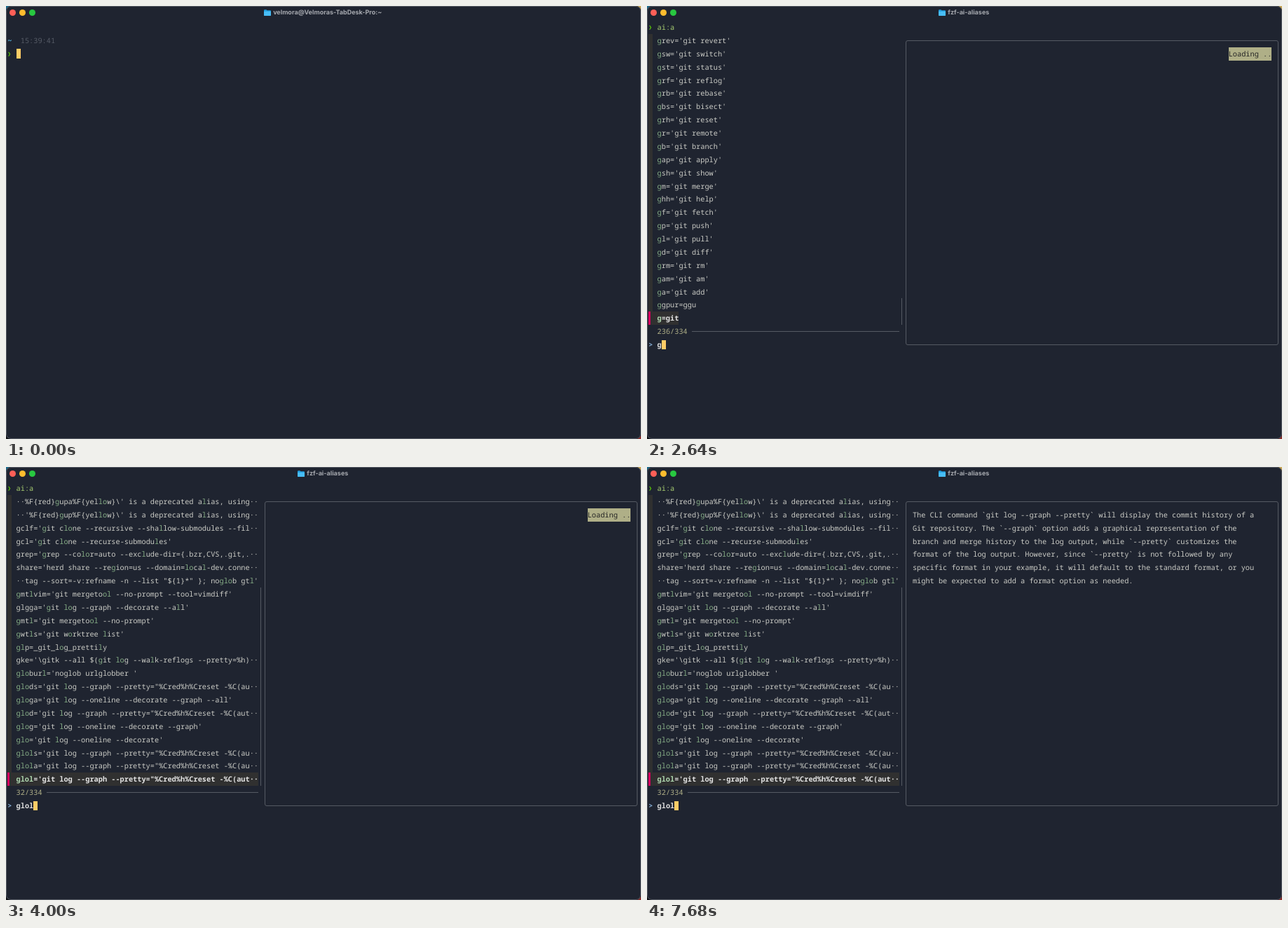
Animation of 906x618 px, one loop 8000 ms. Source, as an HTML page:

```html
<!DOCTYPE html>
<html lang="en">
<head>
<meta charset="utf-8">
<title>Alias picker</title>
<style>
  :root { --bg: #1f2430; --line: #555a63; --cw: 6.175px; --lh: 18.875px; }
  html, body { margin: 0; width: 100%; height: 100%; overflow: hidden; }
  body {
    background:
      linear-gradient(90deg, #1d6c8c 50%, #c9a85a 0) 0 0 / 100% 50% no-repeat,
      linear-gradient(90deg, #101216 50%, #8c2f2c 0) 0 100% / 100% 50% no-repeat;
  }
  #win {
    position: absolute; inset: 0; box-sizing: border-box; overflow: hidden;
    background: var(--bg); border-radius: 7px;
    font: 10.29px/20.875px "Noto Sans Mono", "DejaVu Sans Mono", monospace;
    font-variant-ligatures: none; text-rendering: geometricPrecision;
    color: #cbccc6;
  }
  #win::after {
    content: ""; position: absolute; inset: 0; border-radius: 7px;
    border: 1px solid #565b65;
  }
  #win i { position: absolute; top: 5.1px; width: 9px; height: 9px; border-radius: 50%; }
  #win .title {
    position: absolute; top: 0; left: 0; width: 904.6px; height: 19px;
    display: flex; justify-content: center; align-items: center; gap: 3px;
    font: 700 9px/19px Inter, "Open Sans", sans-serif; color: #a6a9af;
  }
  .scene { position: absolute; inset: 0; visibility: hidden; }
  .scene.on { visibility: visible; }
  .t {
    position: absolute; white-space: pre; height: var(--lh);
    left: calc(2.2px + var(--c) * var(--cw)); top: calc(21px + var(--r) * var(--lh));
  }
  .box { position: absolute; }
  .caret { width: 6.2px; height: 13.7px; margin-top: 2.5px; background: #ffcc66; }
  .arrow { color: #5fd700; font-family: "DejaVu Sans Mono", monospace; font-size: 8px; font-weight: bold; }
  .dir { color: #5cc4f0; font-weight: bold; }
  .time { color: #565b66; }
  .ok { color: #a6cc70; }
  .bad { color: #f28779; }
  .gutter { left: 2.2px; top: 39.9px; width: 6.2px; height: 396.4px; background: #303030; }
  .pointer { left: 2.2px; top: 436.3px; width: 3px; height: 18.9px; background: #d7005f; }
  .rule { top: 464px; right: 546px; height: 1px; background: var(--line); }
  .bar { left: 363px; bottom: 163px; width: 1px; background: var(--line); }
  .preview {
    left: 369px; top: 49px; width: 530px; height: 433px;
    border: 1px solid var(--line); border-radius: 3px;
  }
  .cur { background: #303030; color: #e4e4e4; font-weight: bold; }
  .info { color: #afaf87; }
  .prompt { color: #87afd7; font-weight: bold; }
  .query { color: #dcdcdc; font-weight: bold; }
  .load { background: #afaf87; color: #262626; }
  b { color: #87af87; font-weight: inherit; }
  .cur b { color: #afd7af; }
</style>
</head>
<body>
<div id="win">
  <i style="left:5.3px;background:#ff5f57"></i>
  <i style="left:19px;background:#febc2e"></i>
  <i style="left:32.6px;background:#28c840"></i>
</div>

<!-- Match runs are wrapped in @ -->
<template data-q="" data-n="334">
art='php artisan'
aliases='nvim ~/.dotfiles/functions/aliases.zsh'
ai:i=fzf-ai-input
ai:h=fzf-ai-history
ai:f=fzf-ai-files
ai:a=fzf-ai-aliases
a='php artisan'
_='sudo '
9='cd -9'
8='cd -8'
7='cd -7'
6='cd -6'
5='cd -5'
4='cd -4'
3='cd -3'
2='cd -2'
1='cd -1'
....••=../../../../..
...••=../../../..
..••=../../..
...=../..
-='cd -'
</template>
<template data-q="g" data-n="236">
@g@rev='git revert'
@g@sw='git switch'
@g@st='git status'
@g@rf='git reflog'
@g@rb='git rebase'
@g@bs='git bisect'
@g@rh='git reset'
@g@r='git remote'
@g@b='git branch'
@g@ap='git apply'
@g@sh='git show'
@g@m='git merge'
@g@hh='git help'
@g@f='git fetch'
@g@p='git push'
@g@l='git pull'
@g@d='git diff'
@g@rm='git rm'
@g@am='git am'
@g@a='git add'
@g@gpur=ggu
@g@=git
</template>
<template data-q="gl" data-n="131">
gcl='@g@it c@l@one --recurse-submodules'
grf='@g@it ref@l@og'
gap='@g@it app@l@y'
ghh='@g@it he@l@p'
gwtls='@g@it worktree @l@ist'
@gl@ods='git log --graph --pretty="%Cred%h%Creset -%C(au··
@gl@ols='git log --graph --pretty="%Cred%h%Creset -%C(au··
@gl@ola='git log --graph --pretty="%Cred%h%Creset -%C(au··
@gl@ol='git log --graph --pretty="%Cred%h%Creset -%C(aut··
@gl@od='git log --graph --pretty="%Cred%h%Creset -%C(aut··
@gl@oga='git log --oneline --decorate --graph --all'
@gl@og='git log --oneline --decorate --graph'
@gl@gga='git log --graph --decorate --all'
@gl@gm='git log --graph --max-count=10'
@gl@o='git log --oneline --decorate'
@gl@gp='git log --stat --patch'
@gl@oburl='noglob urlglobber '
@gl@gg='git log --graph'
@gl@p=_git_log_prettily
@gl@g='git log --stat'
@gl@um='git pull upstream'
@gl@='git pull'
</template>
<template data-q="glo" data-n="64">
grbd='git rebase $(@g@it_deve@lo@p_branch)'
grf='@g@it ref@lo@g'
gclf='@g@it c@lo@ne --recursive --shallow-submodules --fil··
gcl='@g@it c@lo@ne --recurse-submodules'
ggpull='@g@it pul@l@ @o@rigin "$(git_current_branch)"'
@gl@p=_git_l@o@g_prettily
gignored='git ls-files -v | @g@rep "^[[:@lo@wer:]]"'
gke='\gitk --all $(@g@it @lo@g --walk-reflogs --pretty=%h)··
glgga='@g@it @lo@g --graph --decorate --all'
glgm='@g@it @lo@g --graph --max-count=10'
glgp='@g@it @lo@g --stat --patch'
glgg='@g@it @lo@g --graph'
glg='@g@it @lo@g --stat'
@glo@ds='git log --graph --pretty="%Cred%h%Creset -%C(au··
@glo@ls='git log --graph --pretty="%Cred%h%Creset -%C(au··
@glo@la='git log --graph --pretty="%Cred%h%Creset -%C(au··
@glo@l='git log --graph --pretty="%Cred%h%Creset -%C(aut··
@glo@d='git log --graph --pretty="%Cred%h%Creset -%C(aut··
@glo@ga='git log --oneline --decorate --graph --all'
@glo@g='git log --oneline --decorate --graph'
@glo@='git log --oneline --decorate'
@glo@burl='noglob urlglobber '
</template>
<template data-q="glol" data-n="32">
··%F{red}@g@upa%F{yel@lo@w}\' is a deprecated a@l@ias, using··
··'%F{red}@g@up%F{yel@lo@w}\' is a deprecated a@l@ias, using··
gclf='@g@it c@lo@ne --recursive --sha@l@low-submodules --fil··
gcl='@g@it c@lo@ne --recurse-submodu@l@es'
grep='@g@rep --co@lo@r=auto --exc@l@ude-dir={.bzr,CVS,.git,.··
share='herd share --re@g@ion=us --domain=@lo@ca@l@-dev.conne··
··tag --sort=-v:refname -n --list "${1}*" }; no@glo@b gt@l@'
@g@mt@l@vim='git mergeto@ol@ --no-prompt --tool=vimdiff'
glgga='@g@it @lo@g --graph --decorate --a@l@l'
@g@mt@l@='git mergeto@ol@ --no-prompt'
@g@wt@l@s='git w@o@rktree @l@ist'
@gl@p=_git_l@o@g_pretti@l@y
gke='\gitk --all $(@g@it @lo@g --wa@l@k-reflogs --pretty=%h)··
@glo@bur@l@='noglob urlglobber '
@glo@ds='git @l@og --graph --pretty="%Cred%h%Creset -%C(au··
@glo@ga='git @l@og --oneline --decorate --graph --all'
@glo@d='git @l@og --graph --pretty="%Cred%h%Creset -%C(aut··
@glo@g='git @l@og --oneline --decorate --graph'
@glo@='git @l@og --oneline --decorate'
@glol@s='git log --graph --pretty="%Cred%h%Creset -%C(au··
@glol@a='git log --graph --pretty="%Cred%h%Creset -%C(au··
@glol@='git log --graph --pretty="%Cred%h%Creset -%C(aut··
</template>
<template id="answer">
The CLI command `git log --graph --pretty` will display the commit history of a
Git repository. The `--graph` option adds a graphical representation of the
branch and merge history to the log output, while `--pretty` customizes the
format of the log output. However, since `--pretty` is not followed by any
specific format in your example, it will default to the standard format, or you
might be expected to add a format option as needed.
</template>

<script>
const LOOP = 8000, ROWS = 22, CURRENT = 22;
const win = document.getElementById('win');

const text = (row, col, html, cls = '') =>
  `<div class="t ${cls}" style="--r:${row};--c:${col}">${html}</div>`;
const box = (cls, style = '') => `<div class="box ${cls}" style="${style}"></div>`;
const caret = (row, col) => text(row, col, '', 'caret');
const lines = el => el.content.textContent.trim().split('\n');
const mark = s => s.replace(/@([^@]+)@/g, '<b>$1</b>');

const title = name => `<div class="title">
  <svg width="10" height="9" viewBox="0 0 10 9">
    <path d="M0 1.2Q0 .2 1 .2H3.4L4.5 1.3H9Q10 1.3 10 2.3V8Q10 9 9 9H1Q0 9 0 8Z" fill="#1f9fe0"/>
    <path d="M0 2.8H10V8Q10 9 9 9H1Q0 9 0 8Z" fill="#48bdf5"/>
  </svg><span>${name}</span></div>`;

const shell = (typed, cls) =>
  title('velmora@Velmoras-TabDesk-Pro:~') +
  text(1, 0, '~', 'dir') + text(1, 3, '15:39:41', 'time') +
  text(2, 0, '❯', 'arrow') + text(2, 2, typed, cls) + caret(2, 2 + typed.length);

const running = title('fzf-ai-aliases') + text(0, 0, '❯', 'arrow') + text(0, 2, 'ai:a', 'ok');

const lists = {};
document.querySelectorAll('template[data-n]').forEach(el => lists[el.dataset.q] = el);

function picker(query, preview = '') {
  const el = lists[query], total = el.dataset.n, info = `${total}/334`;
  const items = lines(el).map((s, i) => i + 1 === CURRENT
    ? text(CURRENT, 0, '  ' + mark(s), 'cur')
    : text(i + 1, 2, mark(s)));
  const thumb = Math.floor(ROWS * ROWS / total) * 18.875;
  return running + box('gutter') + items.join('') + box('pointer') +
    text(23, 2, info, 'info') +
    box('rule', `left:${2.2 + (info.length + 3) * 6.175}px`) +
    box('bar', `height:${thumb}px`) +
    text(24, 0, '&gt;', 'prompt') + text(24, 2, query, 'query') + caret(24, 2 + query.length) +
    box('preview') + preview;
}

const loading = text(2, 134, 'Loading ..', 'load');
const answer = lines(document.getElementById('answer')).map((s, i) => text(i + 2, 61, s)).join('');

const scenes = [
  [0, shell('')],
  [800, shell('a', 'ok')],
  [880, shell('ai', 'bad')],
  [960, shell('ai:', 'bad')],
  [1040, shell('ai:a', 'ok')],
  [1360, running + caret(1, 0)],
  [1520, picker('')],
  [2160, picker('', loading)],
  [2480, picker('g', loading)],
  [2720, picker('gl', loading)],
  [2800, picker('glo', loading)],
  [3040, picker('glol', loading)],
  [5200, picker('glol', answer)],
].map(([start, html]) => {
  const el = document.createElement('div');
  el.className = 'scene';
  el.innerHTML = html;
  win.append(el);
  return { start, el };
});

let shown;
const origin = performance.now();
function draw(now) {
  const t = Math.max(0, now - origin) % LOOP;
  const next = scenes.findLast(s => s.start <= t).el;
  if (next !== shown) {
    shown?.classList.remove('on');
    next.classList.add('on');
    shown = next;
  }
  requestAnimationFrame(draw);
}
draw(origin);
</script>
</body>
</html>
```
